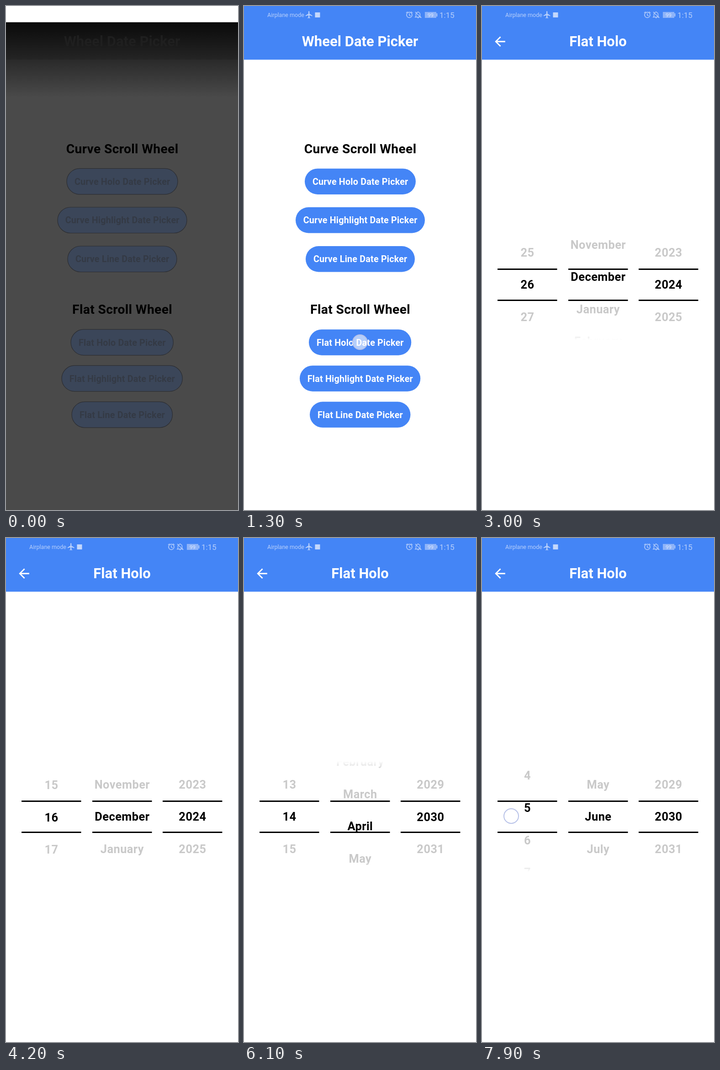
Animation, 508 px wide and 1102 px high, one loop 8 s. Source, as an HTML page with a canvas:

```html
<!DOCTYPE html>
<html lang="en">
<head>
<meta charset="utf-8">
<title>Wheel Date Picker</title>
<style>
  html, body { margin: 0; width: 100%; height: 100%; overflow: hidden; background: #fff; }
  canvas { display: block; }
</style>
</head>
<body>
<canvas id="stage" width="508" height="1102"></canvas>
<script>
const ctx = document.getElementById('stage').getContext('2d');
const LOOP = 8000, STEP = 100, ROW = 70.56, MIDDLE = 609;
const TOP = 488, BOTTOM = 730, FADE = 22, HEADER = 117.4;
const BLUE = '#4485f6';
const MONTHS = ['January', 'February', 'March', 'April', 'May', 'June', 'July',
  'August', 'September', 'October', 'November', 'December'];

const columns = [
  { x: 99, start: 26, label: n => n },
  { x: 254, start: 2, label: n => MONTHS[(n + 12) % 12] },
  { x: 408, start: 2024, label: n => n }
];

// Each swipe drags the wheel by some rows, then coasts to a row.
const swipes = [
  { col: 1, t0: 2600, t1: 2960, x: 254, y: 560, drag: -2.6, to: -1, tau: 80 },
  { col: 0, t0: 3500, t1: 3790, x: 98, y: 540, drag: -2.2, to: 14, tau: 256 },
  { col: 2, t0: 4350, t1: 4570, x: 440, y: 700, drag: 2.2, to: 2030, tau: 256 },
  { col: 1, t0: 5200, t1: 5500, x: 270, y: 670, drag: 1.9, to: 3, tau: 308 },
  { col: 1, t0: 6200, t1: 6400, x: 284, y: 715, drag: 1.2, to: 5, tau: 200 },
  { col: 0, t0: 6920, t1: 7137, x: 97, y: 560, drag: -2.5, to: 5, tau: 240 },
  { col: 0, t0: 7900, t1: 8200, x: 64, y: 608, drag: -2.2, to: 1, tau: 256 }
];
const tap = { t0: 1300, t1: 1400, x: 254, y: 735, drag: 0 };

const buttons = [
  ['Curve Holo Date Picker', 133, 355.4, 243],
  ['Curve Highlight Date Picker', 113, 440, 283],
  ['Curve Line Date Picker', 135, 525, 239],
  ['Flat Holo Date Picker', 142, 707.2, 224.3],
  ['Flat Highlight Date Picker', 122, 786.2, 264.3],
  ['Flat Line Date Picker', 144, 865.3, 220.5]
];

const arrow = new Path2D('M20 11H7.83l5.59-5.59L12 4l-8 8 8 8 1.41-1.41L7.83 13H20z');
const plane = new Path2D('M21 16v-2l-8-5V3.5C13 2.67 12.33 2 11.5 2S10 2.67 10 3.5V9l-8 5v2l8-2.5V19l-2 1.5V22l3.5-1 3.5 1v-1.5L13 19v-5.5z');
const alarm = new Path2D('M362 13.5a6 6 0 1 0 .01 0M362 16v4l3 1.8M355 15.3l3.2-2.8M369 15.3l-3.2-2.8');
const bell = new Path2D('M376.5 23v-5a4.5 4.5 0 0 1 9 0v5l1.5 1.3h-12zM381.2 12v1.5M380 26h2.4M375 13l13 13');

function text(str, x, y, size, color, { weight = 700, spacing = 0, align = 'center' } = {}) {
  ctx.font = `${weight} ${size}px Roboto, sans-serif`;
  ctx.letterSpacing = spacing + 'px';
  ctx.textAlign = align;
  ctx.fillStyle = color;
  ctx.fillText(str, x, y);
}

function rect(x, y, w, h, fill) {
  ctx.fillStyle = fill;
  ctx.fillRect(x, y, w, h);
}

function icon(path, x, y, scale, color) {
  ctx.save();
  ctx.translate(x, y);
  ctx.scale(scale, scale);
  ctx.fillStyle = color;
  ctx.fill(path);
  ctx.restore();
}

function gradient(y0, y1, ...stops) {
  const g = ctx.createLinearGradient(0, y0, 0, y1);
  stops.forEach(([at, color]) => g.addColorStop(at, color));
  return g;
}

function statusBar() {
  const tint = '#b7cffb', plain = { weight: 400, align: 'left' };
  text('Airplane mode', 51, 24, 12.55, tint, plain);
  icon(plane, 133.2, 9.8, 0.78, tint);
  rect(155.5, 14, 11, 11, '#c3d7fc');
  ctx.strokeStyle = tint;
  ctx.lineWidth = 1.4;
  ctx.stroke(alarm);
  ctx.stroke(bell);
  rect(396, 13, 25, 13, '#8fb4f9');
  rect(421.5, 16, 1.8, 7, tint);
  text('99', 408.5, 23.7, 11.5, '#dbe7fd', { weight: 400 });
  text('1:15', 428, 25.8, 17, tint, plain);
}

function menuContent(fill, label, title, outline = 'transparent') {
  text('Wheel Date Picker', 254, 87.8, 31.04, title);
  text('Curve Scroll Wheel', 254.6, 321.5, 28.22, '#000', { spacing: 0.353 });
  text('Flat Scroll Wheel', 254.6, 673.3, 28.22, '#000', { spacing: 0.353 });
  for (const [name, x, y, w] of buttons) {
    ctx.beginPath();
    ctx.roundRect(x, y, w, 56.5, 28.2);
    ctx.fillStyle = fill;
    ctx.fill();
    ctx.strokeStyle = outline;
    ctx.lineWidth = 1.2;
    ctx.stroke();
    text(name, x + w / 2 + 0.2, y + 35.4, 19.76, label, { spacing: 0.18 });
  }
}

function darkMenu() {
  rect(0, 0, 508, 1102, '#4a4a4a');
  rect(0, 0, 508, 200, gradient(36, 200,
    [0, '#0a0a0a'], [0.49, '#242424'], [0.5, '#2a2a2a'], [0.75, '#3a3a3a'], [1, '#4a4a4a']));
  rect(0, 0, 508, 35.5, '#fff');
  menuContent('#3b4659', '#343a45', '#1f1f1f', '#2c2e33');
}

function menu(t) {
  const blue = t < 200 ? '#448aff' : BLUE;
  rect(0, 0, 508, HEADER, blue);
  menuContent(blue, '#fff', '#fff');
}

function position(col, t) {
  const s = swipes.findLast(s => s.col === col && t >= s.t0);
  if (!s) return columns[col].start;
  const from = position(col, s.t0 - 1);
  if (t < s.t1) return from + s.drag * ((t - s.t0) / (s.t1 - s.t0)) ** 2;
  return s.to + (from + s.drag - s.to) * Math.exp((s.t1 - t) / s.tau);
}

function wheel({ x, label }, pos) {
  const near = Math.round(pos);
  ctx.save();
  ctx.beginPath();
  ctx.rect(x - 70, TOP, 140, BOTTOM - TOP);
  ctx.clip();
  for (let n = near - 2; n <= near + 2; n++) {
    text(label(n), x + 0.4, MIDDLE + 9.2 + (n - pos) * ROW, 25.4,
      n === near ? '#000' : '#c9c9c9', { spacing: 0.45 });
  }
  const white = '#fff', clear = 'rgba(255,255,255,0)';
  rect(x - 70, TOP, 140, FADE, gradient(TOP, TOP + FADE, [0, white], [1, clear]));
  rect(x - 70, BOTTOM - FADE, 140, FADE, gradient(BOTTOM - FADE, BOTTOM, [0, clear], [1, white]));
  ctx.restore();
  for (const y of [574, 642]) rect(x - 65, y, 130.5, 3, '#000');
}

function picker(t) {
  rect(0, 0, 508, 1102, '#fff');
  rect(0, 0, 508, HEADER, BLUE);
  icon(arrow, 22.6, 60.8, 1.411, '#fff');
  text('Flat Holo', 254, 87.8, 31.04, '#fff');
  columns.forEach((column, i) => wheel(column, position(i, t)));
}

function touch({ t0, t1, x, y, drag }, t) {
  if (t < t0 || t > t1) return;
  ctx.beginPath();
  ctx.arc(x, y - drag * ROW * ((t - t0) / (t1 - t0)) ** 2, 16, 0, 7);
  ctx.fillStyle = 'rgba(255,255,255,0.6)';
  ctx.fill();
  ctx.strokeStyle = '#b8c2e8';
  ctx.lineWidth = 2;
  ctx.stroke();
}

function draw(t) {
  ctx.globalAlpha = 1;
  if (t < 100) return darkMenu();
  rect(0, 0, 508, 1102, '#fff');
  const fade = Math.min(1, Math.max(0, (t - 1400) / 400));
  if (fade < 1) menu(t);
  if (fade > 0) {
    ctx.globalAlpha = fade;
    picker(t);
    ctx.globalAlpha = 1;
  }
  if (t >= 200) statusBar();
  [tap, ...swipes].forEach(s => touch(s, t));
}

const begin = performance.now();
function tick() {
  const t = (performance.now() - begin) % LOOP;
  draw(Math.floor(t / STEP) * STEP);
  requestAnimationFrame(tick);
}
tick();
</script>
</body>
</html>
```
